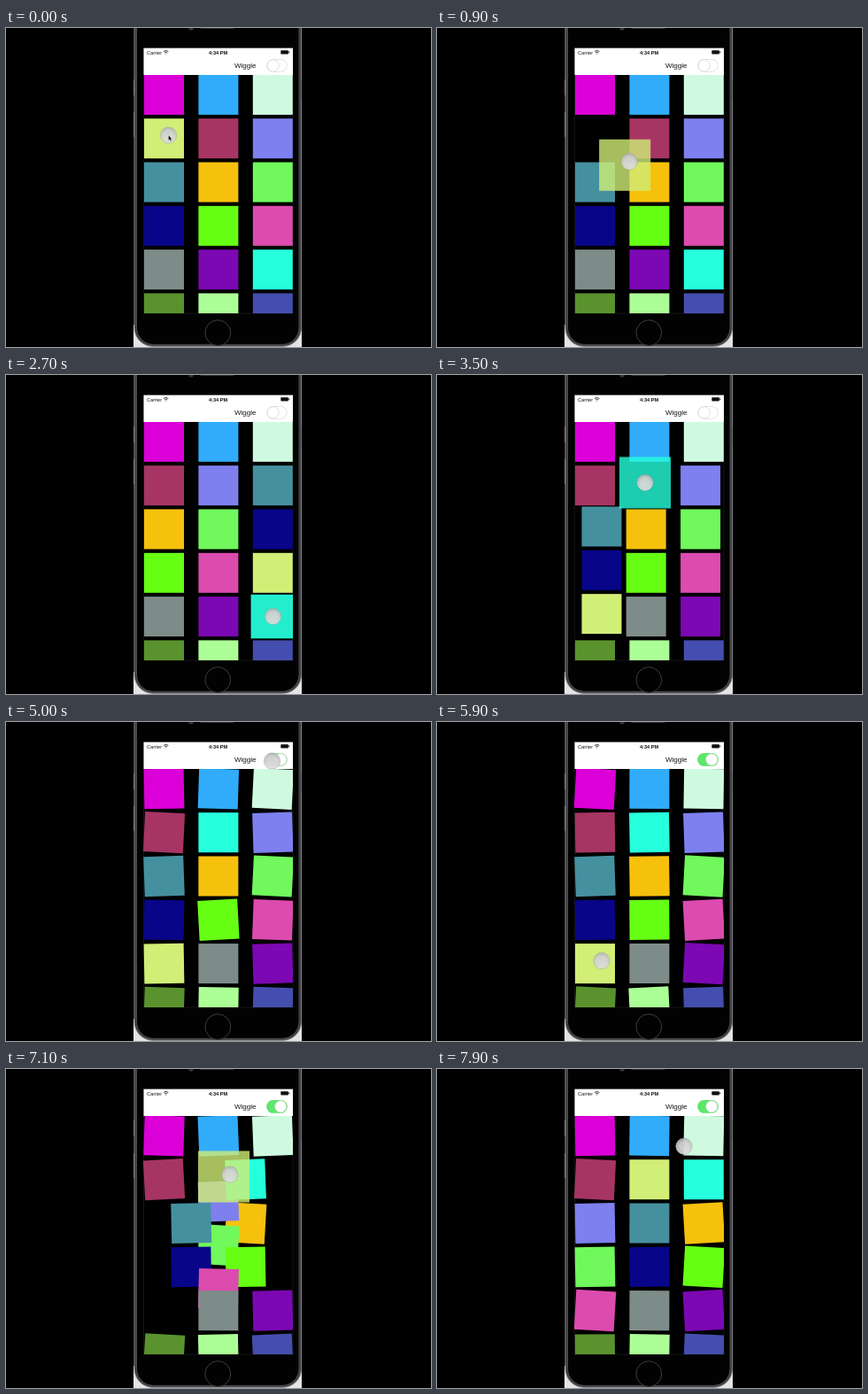
Recreate the animation shown at these times as an HTML page. Size 480 by 360 pixels, loop 8 s.

```html
<!DOCTYPE html>
<html lang="en">
<head>
<meta charset="utf-8">
<title>Wiggle grid</title>
<style>
  html, body { margin: 0; width: 100%; height: 100%; overflow: hidden; background: #000; }
  svg { display: block; }
  text { font-family: "Liberation Sans", Arial, sans-serif; fill: #111; }
</style>
</head>
<body>
<svg width="480" height="360" viewBox="0 0 480 360">
  <defs>
    <linearGradient id="ball" x1="0" y1="0" x2="0" y2="1">
      <stop offset="0" stop-color="#b9b9b9"/>
      <stop offset="1" stop-color="#e2e2e2"/>
    </linearGradient>
  </defs>

  <!-- phone body -->
  <path d="M144 335V360H334V335Z" fill="#e4e4e4"/>
  <rect x="145" y="-60" width="188.5" height="419.3" rx="21" fill="#3a3a3d" stroke="#85858a"/>
  <rect x="147.5" y="-60" width="183.5" height="417.3" rx="19" fill="#020202" stroke="#5c5c60" stroke-width=".8"/>
  <path d="M144.5 58V76M144.5 95V123M333.5 58V80" stroke="#77777c"/>
  <rect x="219" y="-3" width="39" height="4" rx="2" fill="#333"/>
  <circle cx="209" cy="0" r="2.8" fill="#333336"/>
  <circle cx="239.3" cy="344" r="14.4" fill="#020202" stroke="#3e3e40"/>

  <rect x="155.5" y="22.5" width="168.5" height="299.5" fill="#000" stroke="#151515"/>
  <svg id="grid" x="155" y="53" width="169" height="269" viewBox="155 53 169 269"></svg>

  <!-- status and navigation bars -->
  <rect x="155.5" y="22.7" width="168.5" height="30.3" fill="#fff"/>
  <text x="159" y="29.7" font-size="5.6">Carrier</text>
  <g fill="none" stroke="#111" stroke-width=".8">
    <path d="M178 26.5Q180.7 24.2 183.4 26.5M179.2 27.8Q180.7 26.5 182.2 27.8"/>
    <path d="M180.2 29H181.2"/>
  </g>
  <text x="239.5" y="29.7" font-size="5.6" font-weight="bold" text-anchor="middle">4:34 PM</text>
  <rect x="310.3" y="25.2" width="8.6" height="4.2" rx=".7" fill="#111"/>
  <rect x="319.3" y="26.5" width="1" height="1.6" fill="#111"/>
  <text x="258" y="45.3" font-size="8">Wiggle</text>

  <rect x="294.7" y="35.5" width="22.6" height="13.8" rx="6.9" fill="#fff" stroke="#e3e3e3"/>
  <rect id="on" x="294.2" y="35" width="23.6" height="14.8" rx="7.4" fill="#5ce86b"/>
  <circle id="knob" cy="42.4" r="6.6" fill="#fff" stroke="#ccc" stroke-width=".6"/>

  <g id="finger">
    <circle r="9.2" fill="url(#ball)" stroke="#999" stroke-opacity=".6" stroke-width=".8" opacity=".9"/>
    <circle r="6" cy="-.5" fill="#ddd" opacity=".45"/>
    <path id="arrow" d="M0 0V6L1.4 4.7L2.5 7L3.4 6.5L2.4 4.4H4Z" fill="#000" stroke="#fff" stroke-width=".3"/>
  </g>
</svg>
<script>
const LOOP = 8000, STEP = 100, SIZE = 45, SWITCH_ON = 4740;
const $ = id => document.getElementById(id);
const mix = (a, b, k) => a + (b - a) * k;
const ease = u => { u = Math.min(1, Math.max(0, u)); return u * u * (3 - 2 * u); };

// back to front: colour, first slot, wiggle phase, wiggle rate (rad/s)
const tiles = [
  ['#dc00d8', 0, 3.44, 32.5], ['#30acfa', 1, .6, 20.3], ['#d0fae0', 2, 1.03, 20.1],
  ['#a63564', 4, 1.03, 19.5], ['#f6c10c', 7, 3.14, 35.2], ['#7d80ee', 5, -.6, 20.9],
  ['#70f85c', 8, 1.03, 21.2], ['#45909f', 6, -.65, 34.9], ['#080588', 9, .3, 31.4],
  ['#66ff14', 10, -1.3, 29.2], ['#dc4bae', 11, .7, 32.8], ['#7e8c89', 12, 0, 31.4],
  ['#7b08b2', 13, -.6, 30], ['#5a922d', 15, .6, 21.4], ['#acff96', 16, .29, 19.5],
  ['#444eae', 17, .6, 19.6], ['#26ffdc', 14, 0, 20.6], ['#d1ee77', 3, -.29, 20]
].map(([color, slot, phase, rate]) => {
  const el = document.createElementNS('http://www.w3.org/2000/svg', 'rect');
  const half = -SIZE / 2;
  for (const [k, v] of Object.entries({ x: half, y: half, width: SIZE, height: SIZE, fill: color }))
    el.setAttribute(k, v);
  $('grid').append(el);
  return { el, slot, phase, rate };
});
const cyan = tiles.at(-2), yellow = tiles.at(-1);

// reorderings: time, from slot, to slot
const moves = [[1329, 3, 11], [3245, 14, 4], [6950, 12, 4]];
// lifts: tile, pick up, let go, tile centre relative to the finger
const lifts = [
  [yellow, 300, 1800, -5, 4],
  [cyan, 2600, 3750, 0, 0],
  [yellow, 6150, 7450, -7, 2.5]
];
// finger stops: time, x, y
const stops = [
  [0, 183.5, 121], [650, 183.5, 121], [1350, 299, 223], [1850, 299, 223],
  [2400, 301.5, 272.5], [2750, 301.5, 272.5], [3300, 235, 121.5], [3850, 235, 121.5],
  [4550, 300.5, 44], [5100, 300.5, 44], [5700, 186, 269.5], [6350, 186, 269.5],
  [7000, 253, 119], [7500, 253, 119], [8100, 288, 76]
];

const slotAt = s => [178.5 + s % 3 * 61.4, 75.4 + Math.floor(s / 3) * 49.3];

function reorder(s, from, to) {
  if (s === from) return to;
  if (s > from && s <= to) return s - 1;
  if (s >= to && s < from) return s + 1;
  return s;
}

function fingerAt(t) {
  const i = stops.findIndex(s => s[0] > t);
  const [t0, x0, y0] = stops[i - 1], [t1, x1, y1] = stops[i];
  const k = ease((t - t0) / (t1 - t0));
  return [mix(x0, x1, k), mix(y0, y1, k)];
}

function placeTile(tile, t, [fx, fy]) {
  let s = tile.slot, [x, y] = slotAt(s), lift = 0;
  for (const [start, from, to] of moves) {
    s = reorder(s, from, to);
    const [nx, ny] = slotAt(s), k = ease((t - start) / 300);
    x = mix(x, nx, k);
    y = mix(y, ny, k);
  }
  for (const [held, pick, drop, dx, dy] of lifts) {
    if (held !== tile) continue;
    const k = ease((t - pick) / 250) * (1 - ease((t - drop) / 300));
    x = mix(x, fx + dx, k);
    y = mix(y, fy + dy, k);
    lift += k;
  }
  const still = t < SWITCH_ON || tile === yellow && t > 5700;
  const turn = still ? 0 : 3.3 * Math.sin(tile.phase + tile.rate * (t - 5000) / 1000);
  tile.el.setAttribute('transform', `translate(${x} ${y}) rotate(${turn}) scale(${1 + .29 * lift})`);
  tile.el.setAttribute('opacity', 1 - .2 * lift);
}

function draw(now) {
  const t = Math.floor(now % LOOP / STEP) * STEP;
  const finger = fingerAt(t);
  tiles.forEach(tile => placeTile(tile, t, finger));
  $('finger').setAttribute('transform', `translate(${finger})`);
  $('arrow').setAttribute('opacity', t < 300 ? 1 : 0);
  $('on').setAttribute('opacity', ease((t - SWITCH_ON) / 500));
  $('knob').setAttribute('cx', mix(301.7, 310.2, ease((t - SWITCH_ON) / 260)));
  requestAnimationFrame(() => draw(performance.now()));
}
draw(performance.now());
</script>
</body>
</html>
```
